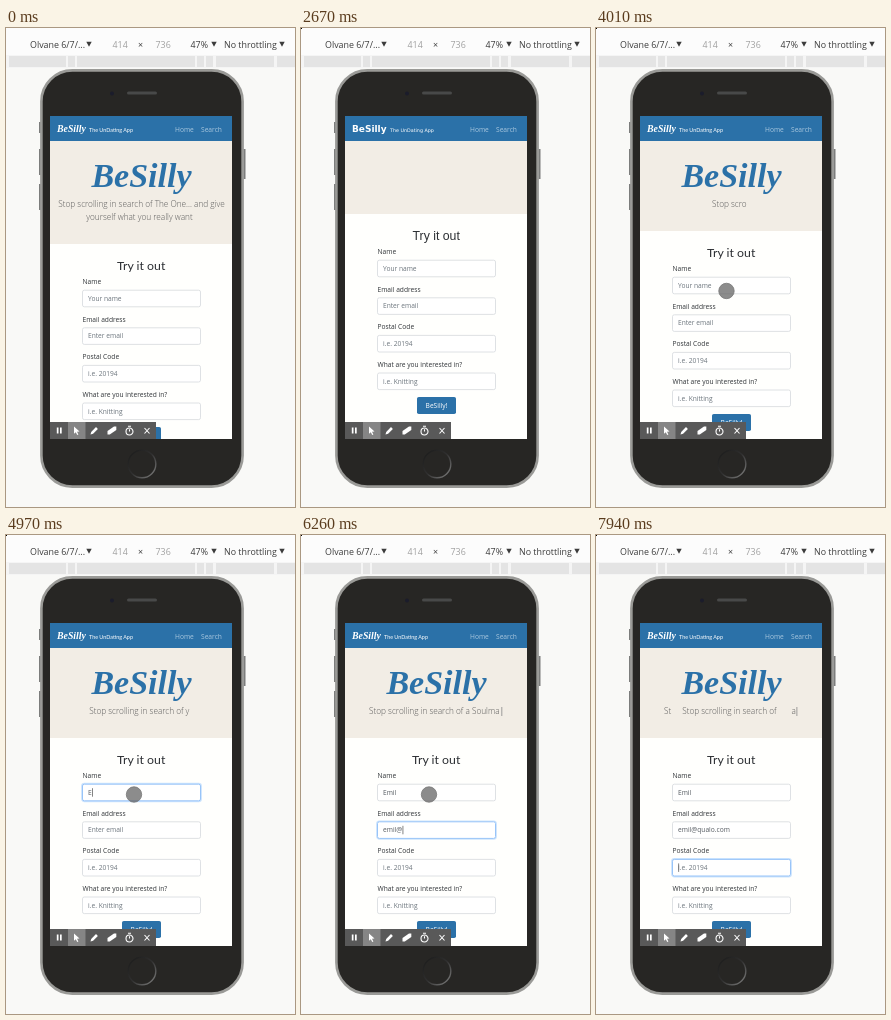
Recreate the animation shown at these times as an HTML page. Size 289 by 479 pixels, loop 8000 ms.

```html
<!DOCTYPE html>
<html lang="en">
<head>
<meta charset="utf-8">
<title>Phone preview</title>
<style>
  html, body { margin: 0; width: 100%; height: 100%; overflow: hidden; background: #f9f9f7; }
  svg { display: block; width: 289px; height: 479px; font: 6.65px "Open Sans", "Noto Sans", sans-serif; }
  text { white-space: pre; }
  .bar { font-size: 8.9px; fill: #3c3c3c; }
  .dim { fill: #a0a0a0; }
  .brand { font: italic bold 34px "Liberation Serif", serif; fill: #2b71a8; }
  .small { font-size: 9.8px; fill: #fff; }
  .sub { font: 5.4px Lato, sans-serif; fill: #fff; }
  .plain .small { font: bold 9px "DejaVu Sans", sans-serif; }
  .plain .sub { font: 4.8px "DejaVu Sans", sans-serif; }
  .plain #title { display: none; }
  .plain #head { font-family: "Liberation Sans", sans-serif; }
  .lead { font-size: 8.22px; font-weight: 300; fill: #585858; }
  #head { font: 12.3px Lato, sans-serif; fill: #2c2f33; }
  .mid { text-anchor: middle; }
  .label { fill: #303438; }
  .box { fill: #fff; stroke: #d6dade; stroke-width: .8; }
  .focus .box { stroke: #98c4f8; stroke-width: 1; }
  .ring { fill: none; stroke: #007bff; stroke-opacity: 0; stroke-width: 1.4; }
  .focus .ring { stroke-opacity: .2; }
  .value { fill: #555b61; }
  .empty .value { fill: #6c757d; }
  .bar-icons { fill: #fff; stroke: #fff; stroke-width: 0; }
</style>
</head>
<body>
<svg viewBox="0 0 289 479">
  <defs>
    <clipPath id="screen"><path d="M44 88h182v323H44z"/></clipPath>
    <linearGradient id="rim" x2="1" y2="1">
      <stop offset="0" stop-color="#191919"/><stop offset=".5" stop-color="#303030"/><stop offset="1" stop-color="#858585"/>
    </linearGradient>
  </defs>

  <!-- device toolbar -->
  <path fill="#fcfcfc" d="M0 0h289v27H0z"/>
  <path fill="#f5f5f5" d="M0 27h289v13H0z"/>
  <path fill="#e4e4e4" d="M3 28h57v11H3zM62 28h7v11h-7zM71 28h118v11H71zM191 28h7v11h-7zM200 28h7v11h-7zM210 28h58v11h-58zM271 28h18v11h-18z"/>
  <g class="bar" transform="translate(0 .8)">
    <text x="24" y="19">Olvane 6/7/...</text>
    <text x="106.5" y="19" class="dim">414</text>
    <text x="132" y="19">×</text>
    <text x="149.5" y="19" class="dim">736</text>
    <text x="184.5" y="19">47%</text>
    <text x="218" y="19">No throttling</text>
    <path d="M80.300 13h5.400l-2.700 5zM205.300 13h5.400l-2.700 5zM273.300 13h5.400l-2.700 5z"/>
  </g>
  <rect id="dot" width="1" height="1"/>

  <!-- phone -->
  <path fill="#7c7d7c" d="M33 94h2v11h-2zM33 121h2v26h-2zM33 156h2v26h-2zM237.500 121h2v30h-2z"/>
  <rect x="35.400" y="42.400" width="201.200" height="416.200" rx="31" fill="#272624" stroke="#9a9a97" stroke-width="2.600"/>
  <circle cx="106" cy="65.500" r="2" fill="#1b1c2b"/>
  <rect x="121" y="63.500" width="30" height="3" rx="1.500" fill="#484949"/>
  <circle cx="136" cy="436" r="13.800" fill="#272624" stroke="url(#rim)" stroke-width="1.400"/>

  <!-- page -->
  <g id="page" clip-path="url(#screen)">
    <path fill="#fffffd" d="M44 113h183v299H44z"/>
    <rect id="hero" x="44" y="113" width="183" fill="#f2ede5"/>
    <path fill="#2b71a8" d="M44 88h183v25H44z"/>
    <text class="brand small" x="51" y="104">BeSilly</text>
    <text id="sub" class="sub" y="104">The UnDating App</text>
    <g fill="#a9c7de"><text x="169" y="103.500">Home</text><text x="195" y="103.500">Search</text></g>
    <text id="title" class="brand mid" x="135.500" y="159">BeSilly</text>
    <text id="line1" class="lead mid" y="179"></text>
    <text id="line2" class="lead mid" x="133.500" y="192"></text>
    <g id="rest"><text class="lead" x="68" y="179">St</text><text class="lead" x="195.500" y="179">a</text></g>
    <rect id="caret" width=".8" height="9" fill="#888"/>
    <g id="form">
      <text id="head" class="mid" x="135.200" y="229">Try it out</text>
      <g id="fields"></g>
      <rect x="116" y="386" width="39" height="17" rx="1.800" fill="#2b71a8"/>
      <text class="mid" x="135.500" y="397" fill="#fff">BeSilly!</text>
    </g>
    <circle id="touch" r="7.700" fill="#606060" fill-opacity=".72" stroke="#777" stroke-width=".8"/>
  </g>

  <!-- recorder controls -->
  <path fill="#595959" d="M44 394h106v17H44z"/>
  <path fill="#858585" d="M62 394h17.500v17H62z"/>
  <g class="bar-icons">
    <path d="M50.800 399.500h1.700v6h-1.700zM54 399.500h1.700v6H54z"/>
    <path d="M68 398.500l5.500 5-2.500.2 1.400 2.800-1.200.6-1.400-2.900-1.800 1.600z"/>
    <path d="M84.500 406.500l.7-2.600 4.800-4.800 1.900 1.900-4.800 4.800z"/>
    <path d="M101.500 403l6.500-4.500h2.300v3.500l-6.500 4.500h-2.300z"/>
    <path fill="none" stroke-width="1.100" d="M120 403.500a3.500 3.500 0 1 0 7 0a3.500 3.500 0 1 0-7 0M123.500 403.500v-2.200M122 398.300h3M138.500 400l5 5.500M143.500 400l-5 5.500"/>
  </g>
</svg>
<script>
const $ = id => document.getElementById(id);
const LOOP = 8000;
const LEAD = 'Stop scrolling in search of a Soulmate';

// Bursts of screen updates: first, last, count
const bursts = [[100, 250, 2], [1090, 1240, 2], [2670, 3700, 8], [3880, 4810, 8],
  [4970, 5980, 8], [6110, 6960, 6], [7190, 7940, 6]];

const leadKeys = [[3600, 0], [4010, 9], [4970, 29], [5980, 35], [6260, 36], [6450, 38], [7190, 38], [7940, 27]];
const nameKeys = [[4830, 0], [4970, 1], [5390, 4]];
const mailKeys = [[5600, 0], [6260, 5], [6960, 14]];
const touchX = [[3400, 270], [3550, 200], [3700, 152], [3880, 140], [4010, 130.5], [4280, 128]];
const touchY = [[3400, 90], [3550, 225], [3700, 285], [3880, 293], [4010, 263], [4280, 259.5]];
const blink = [[0, 0], [100, .5], [250, 1], [1090, .5], [1240, 0], [4140, 1], [4900, 0], [5800, 1], [6900, 0]];

function snap(t) {
  const b = bursts.findLast(b => t >= b[0]);
  if (!b) return 0;
  const [start, end, n] = b, step = (end - start) / (n - 1);
  return start + step * Math.min(n - 1, Math.floor((t - start) / step + .15));
}

function at(keys, t) {
  const i = keys.findIndex(k => k[0] > t);
  if (i < 0) return keys.at(-1)[1];
  if (!i) return keys[0][1];
  const [t0, a] = keys[i - 1], [t1, b] = keys[i];
  return a + (b - a) * (t - t0) / (t1 - t0);
}

const hold = (keys, t) => keys.findLast(k => k[0] <= t)[1];
const typed = (s, keys, t) => s.slice(0, Math.floor(at(keys, t) + .001));
const show = (el, on) => el.style.display = on ? '' : 'none';

const hints = [['Name', 'Your name'], ['Email address', 'Enter email'],
  ['Postal Code', 'i.e. 20194'], ['What are you interested in?', 'i.e. Knitting']];

$('fields').innerHTML = hints.map(([label], i) => `<g transform="translate(76.500 ${243.2 + 37.6 * i})">
  <text class="label">${label}</text>
  <rect class="ring" x="-.7" y="5.300" width="119.400" height="18" rx="2.500"/>
  <rect class="box" y="6" width="118" height="16.600" rx="1.800"/>
  <text class="value" x="5.500" y="16.700"></text>
  <rect class="bar-caret" y="10" width=".8" height="8.500" fill="#666"/></g>`).join('');
const fields = [...$('fields').children];

function setField(i, value, focus) {
  const g = fields[i], text = g.querySelector('.value'), caret = g.querySelector('.bar-caret');
  text.textContent = value || (focus && i < 2 ? '' : hints[i][1]);
  g.classList.toggle('empty', !value);
  g.classList.toggle('focus', focus);
  show(caret, focus);
  caret.setAttribute('x', 5.8 + (value ? text.getComputedTextLength() : 0));
}

function draw(now) {
  const time = now % LOOP, t = snap(time);
  const old = t < 2600, plain = !old && t < 2800;
  const dy = old ? 13 : plain ? -17 : 0;

  show($('dot'), time >= 2390);
  $('page').classList.toggle('plain', plain);
  $('sub').setAttribute('x', plain ? 89 : 83);
  $('hero').setAttribute('height', 90 + dy);
  $('form').setAttribute('transform', `translate(0 ${dy})`);

  let lead = typed(LEAD, leadKeys, t);
  if (lead.length === 29 && t < 6000) lead = lead.slice(0, -1) + 'y';
  $('line1').textContent = old ? 'Stop scrolling in search of The One... and give' : lead;
  $('line1').setAttribute('x', old ? 135.5 : 133.3);
  $('line2').textContent = old ? 'yourself what you really want' : '';

  const last = t >= 7930;
  show($('rest'), last);
  const end = 133.4 + $('line1').getComputedTextLength() / 2 + 1.8;
  $('caret').setAttribute('x', old ? 188 : last ? 200.5 : end);
  $('caret').setAttribute('y', old ? 185 : 172);
  $('caret').setAttribute('opacity', last ? 1 : t > 2600 && t < 3600 ? 0 : hold(blink, t));

  const focus = t < 4400 ? -1 : t < 5500 ? 0 : t < 7190 ? 1 : 2;
  const values = [typed('Emil', nameKeys, t), typed('emil@qualo.com', mailKeys, t), '', ''];
  values.forEach((v, i) => setField(i, v, i === focus));

  show($('touch'), t >= 3400 && t < 7190);
  $('touch').setAttribute('cx', at(touchX, t));
  $('touch').setAttribute('cy', at(touchY, t));
}

const begin = performance.now();
function tick() {
  draw(performance.now() - begin);
  requestAnimationFrame(tick);
}
tick();
</script>
</body>
</html>
```
